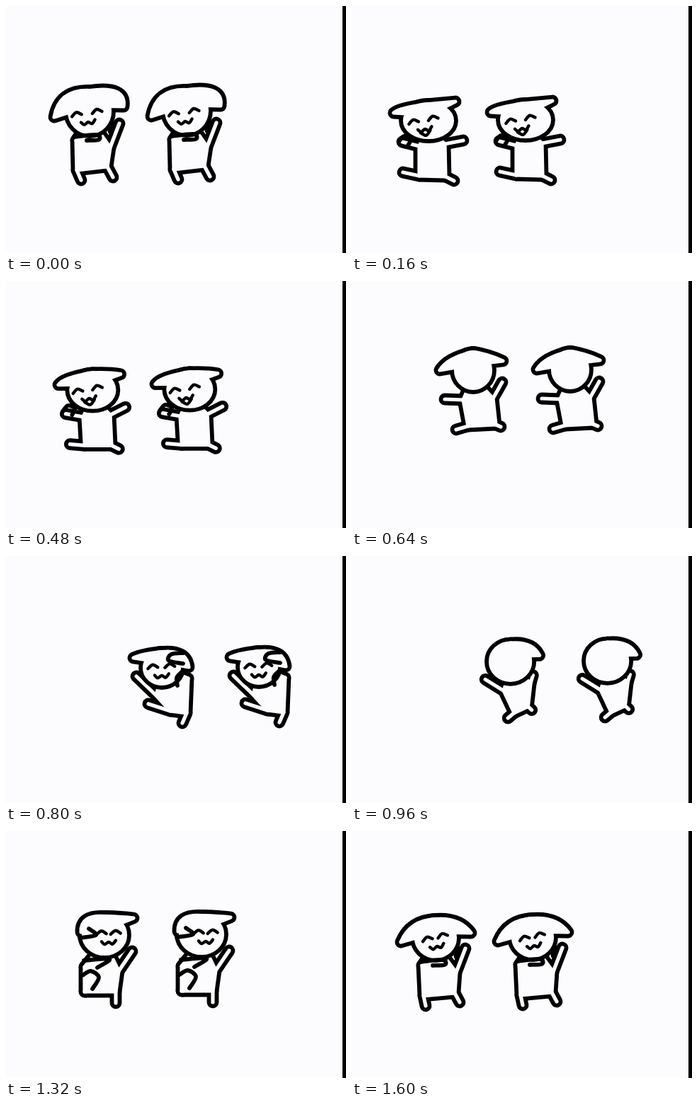
An HTML page with a canvas for the animation above (1640 ms loop, 480 by 349 pixels).

```html
<!DOCTYPE html>
<html>
<head>
<meta charset="utf-8">
<style>
  html, body { margin: 0; height: 100%; overflow: hidden; background: #fcfcfe; }
  canvas { display: block; }
</style>
</head>
<body>
<canvas id="stage" width="480" height="349"></canvas>
<script>
const ctx = document.getElementById('stage').getContext('2d');
const LOOP = 1640, STEP = 40, PAPER = '#fcfcfe', INK = '#000';
const LINE = 5.8, RADIUS = 5.5;

// head: x, y, rx, ry. Ears: bend and tip. Limbs: joint and tip.
// face: mouth x, mouth y, half eye gap, tilt. folds: loose lines on top.
const clap = {
  head: [118, 149, 34, 35], earL: [75, 118, 68, 157], earR: [170, 112, 166, 142],
  armL: [99, 190, 101, 190], armR: [147, 200, 160, 166],
  legL: [100, 232, 106, 246], legR: [143, 227, 151, 242],
  face: [116, 164, 14.5, -.15],
  folds: [[[97, 185], [128, 182], [131, 189], [114, 190]], [[147, 168], [147, 178], [152, 166]]]
};
const settle = {
  ...clap,
  head: [118, 151, 33, 32], earL: [82, 126, 69, 157], earR: [152, 122, 168, 144],
  legL: [101, 233, 104, 247], legR: [145, 229, 152, 242],
  face: [120, 163, 11, -.22]
};
const stretch = {
  head: [113, 156, 39, 29], earL: [70, 138, 64, 145], earR: [140, 130, 151, 129],
  armL: [100, 192, 76, 186], armR: [136, 189, 162, 184],
  legL: [100, 234, 77, 229], legR: [137, 235, 149, 241],
  face: [108, 168, 14, -.18], grin: true,
  folds: [[[71, 186], [78, 178], [88, 182], [84, 191]]]
};
const hop = {
  head: [171, 126, 30, 31], earL: [135, 108, 124, 126], earR: [192, 103, 213, 113],
  armL: [157, 168, 131, 167], armR: [199, 166, 212, 143],
  legL: [164, 205, 147, 210], legR: [203, 203, 210, 206],
  folds: []
};
const cheer = {
  head: [220, 158, 30, 28], earL: [192, 138, 180, 144], earR: [255, 132, 258, 157],
  armL: [212, 197, 184, 170], armR: [257, 173, 247, 169],
  legL: [232, 219, 201, 209], legR: [255, 222, 249, 236],
  face: [220, 169, 12, -.06],
  folds: [[[250, 137], [233, 139], [230, 148], [250, 152]], [[242, 183], [241, 172], [248, 164]]]
};
const turn = {
  head: [194, 145, 36, 34], earL: [175, 130, 180, 140], earR: [222, 114, 237, 131],
  armL: [184, 188, 159, 179], armR: [217, 185, 229, 170],
  legL: [195, 225, 201, 244], legR: [212, 208, 225, 207],
  folds: []
};
const kick = {
  head: [139, 147, 35, 32], earL: [105, 118, 106, 143], earR: [165, 121, 180, 123],
  armL: [111, 192, 112, 191], armR: [159, 198, 178, 170],
  legL: [111, 227, 113, 227], legR: [155, 227, 155, 243],
  face: [145, 157, 10, -.03],
  folds: [[[104, 151], [127, 147], [117, 138]], [[110, 183], [146, 181], [129, 193]],
    [[108, 204], [120, 198], [131, 207], [122, 223]]]
};

const keys = [
  [0, clap], [160, stretch, -5, 6], [280, stretch], [440, stretch, 3, 9],
  [560, hop, -36, 6], [640, hop], [680, hop, 12, -2], [800, cheer],
  [900, cheer, 9, 2], [1000, turn, 26, -3], [1120, turn], [1200, turn, -24, 2],
  [1320, kick], [1440, kick, -22, 2], [1600, settle], [LOOP, clap]
].map(([time, pose, dx = 0, dy = 0]) => ({ time, pose, shift: [dx, dy] }));

const mix = (a, b, k) => a.map((v, i) => v + (b[i] - v) * k);

// Smooth open line through every point.
function curve(list) {
  const at = i => list[Math.max(0, Math.min(list.length - 1, i))];
  ctx.beginPath();
  ctx.moveTo(...list[0]);
  for (let i = 0; i < list.length - 1; i++) {
    const [a, b, c, d] = [at(i - 1), at(i), at(i + 1), at(i + 2)];
    ctx.bezierCurveTo(b[0] + (c[0] - a[0]) / 6, b[1] + (c[1] - a[1]) / 6,
      c[0] - (d[0] - b[0]) / 6, c[1] - (d[1] - b[1]) / 6, c[0], c[1]);
  }
  ctx.stroke();
}

// Swollen shapes merged under one common outline.
function blob(...parts) {
  for (const [color, grow] of [[INK, LINE], [PAPER, -LINE]]) {
    ctx.fillStyle = ctx.strokeStyle = color;
    ctx.lineWidth = 2 * RADIUS + grow;
    for (const part of parts) {
      ctx.beginPath();
      part();
      ctx.fill();
      ctx.stroke();
    }
  }
  ctx.strokeStyle = INK;
}

const limb = ([x, y, tipX, tipY]) => () => {
  ctx.moveTo(x, y);
  ctx.lineTo(tipX, tipY);
};

function drawBody({ head: [x, y], armL, armR, legL, legR }) {
  const torso = () => {
    ctx.moveTo(x, y + 10);
    for (const joint of [armR, legR, legL, armL]) ctx.lineTo(joint[0], joint[1]);
    ctx.closePath();
  };
  blob(torso, ...[armL, armR, legL, legR].map(limb));
}

function drawHead({ head: [x, y, rx, ry], earL, earR }) {
  const skull = () => ctx.ellipse(x, y, rx - RADIUS, ry - RADIUS, 0, 0, 7);
  const ear = bend => () => {
    ctx.moveTo(x, y - ry + RADIUS);
    ctx.quadraticCurveTo(...bend);
    ctx.lineTo(x, y - 8);
    ctx.closePath();
  };
  blob(skull, ear(earL), ear(earR));
}

function drawFace([x, y, gap, tilt], grin) {
  ctx.save();
  ctx.translate(x, y);
  ctx.rotate(tilt);
  ctx.lineWidth = 4.4;
  for (const side of [-gap, gap]) curve([[side - 7, -11], [side, -16], [side + 7, -12]]);
  curve([[-10, -1], [-6, 3], [0, 0], [5, 3], [10, -2]]);
  if (grin) curve([[-7, 4], [0, 9], [7, 3]]);
  ctx.restore();
}

function drawDog(time) {
  const next = keys.findIndex(key => key.time > time);
  const a = keys[next - 1], b = keys[next];
  const k = (time - a.time) / (b.time - a.time);
  const near = (k < .5 ? a : b).pose;
  const now = {};
  for (const part of ['head', 'earL', 'earR', 'armL', 'armR', 'legL', 'legR'])
    now[part] = mix(a.pose[part], b.pose[part], k);

  ctx.save();
  ctx.translate(...mix(a.shift, b.shift, k));
  drawBody(now);
  drawHead(now);
  ctx.translate(now.head[0] - near.head[0], now.head[1] - near.head[1]);
  ctx.lineWidth = LINE;
  near.folds.forEach(curve);
  if (near.face) drawFace(near.face, near.grin);
  ctx.restore();
}

function frame() {
  const time = Math.floor(performance.now() % LOOP / STEP) * STEP;
  ctx.fillStyle = PAPER;
  ctx.fillRect(0, 0, 480, 349);
  ctx.lineCap = ctx.lineJoin = 'round';
  drawDog(time);
  ctx.save();
  ctx.translate(137, -1);
  drawDog(time);
  ctx.restore();
  ctx.fillStyle = INK;
  ctx.fillRect(475, 0, 5, 349);
  requestAnimationFrame(frame);
}
frame();
</script>
</body>
</html>
```
